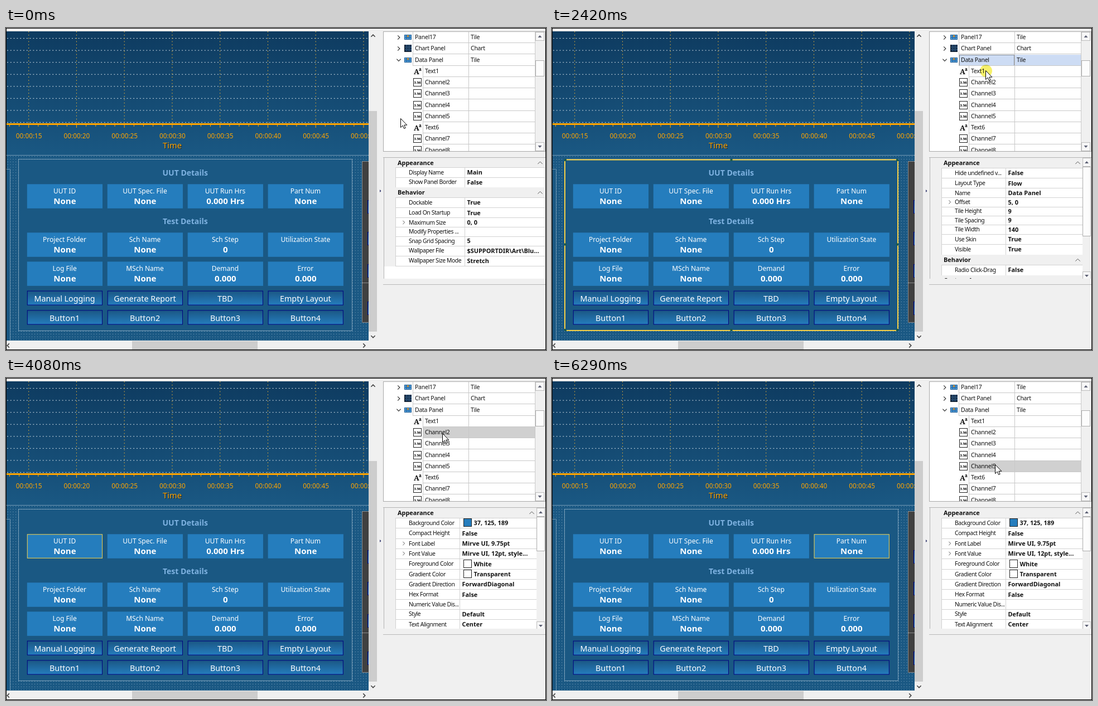
Recreate the animation shown at these times as an HTML page. Size 968x578 px, loop 7.48 s.

```html
<!DOCTYPE html>
<html lang="en">
<head>
<meta charset="utf-8">
<title>Panel properties</title>
<style>
html, body { margin: 0; width: 100%; height: 100%; overflow: hidden; background: #f0f0f0; }
svg { display: block; width: 968px; height: 578px; }
text { font-family: "Noto Sans", sans-serif; white-space: pre; }
#glow { mix-blend-mode: multiply; }
.mid { text-anchor: middle; }
.axis { font-size: 11.8px; fill: #ffa500; }
.time { font-size: 14.6px; fill: #ffa500; }
.head { font-size: 14px; font-weight: 700; fill: #7eb2e1; }
.label { font-size: 12px; fill: #fff; }
.value { font-size: 15px; font-weight: 700; fill: #fff; }
.button { font-size: 14.3px; fill: #fff; }
.tree { font-size: 10.5px; letter-spacing: -.25px; fill: #111; }
.name { font-size: 10.4px; letter-spacing: -.4px; fill: #111; }
.bold { font-size: 10.9px; font-weight: 700; fill: #111; }
</style>
</head>
<body>
<svg id="stage" viewBox="0 0 968 578" xmlns="http://www.w3.org/2000/svg"></svg>
<script>
const LOOP = 7480;
const FONT = 'Mirve UI';
const SCALE = .966;
const SNAP = 5 * SCALE;

const rect = (x, y, w, h, fill, more = '') => `<rect x="${x}" y="${y}" width="${w}" height="${h}" fill="${fill}" ${more}/>`;
const box = (x, y, w, h, fill, stroke, more = '') => rect(x + .5, y + .5, w - 1, h - 1, fill, `stroke="${stroke}" ${more}`);
const path = (d, stroke, more = '') => `<path d="${d}" fill="none" stroke="${stroke}" ${more}/>`;
const text = (x, y, cls, s, more = '') => `<text x="${x}" y="${y}" class="${cls}" ${more}>${s}</text>`;
const repeat = (n, f) => Array.from({ length: n }, (_, i) => f(i)).join('');
const dots = n => `stroke-dasharray="1 ${n}"`;

// Chevron pointing u, d, l or r around a centre.
function chevron(x, y, dir, size, color, width = 1.2) {
  const turn = { u: 0, r: 90, d: 180, l: 270 }[dir];
  return path(`M${-size} ${size / 2}L0 ${-size / 2}L${size} ${size / 2}`, color,
    `stroke-width="${width}" transform="translate(${x} ${y}) rotate(${turn})"`);
}

const defs = `<defs>
  <linearGradient id="sky" x1="0" y1="0" x2="0" y2="1"><stop offset="0" stop-color="#0e3b60"/><stop offset="1" stop-color="#1a5883"/></linearGradient>
  <linearGradient id="push" x1="0" y1="0" x2="0" y2="1"><stop offset="0" stop-color="#1b5784"/><stop offset="1" stop-color="#257dbd"/></linearGradient>
  <pattern id="snap" x="22" y="235" width="${SNAP}" height="${SNAP}" patternUnits="userSpaceOnUse"><rect width="1" height="1" fill="#86a9c2"/></pattern>
  <clipPath id="view"><rect x="1" y="6" width="649" height="555"/></clipPath>
  <clipPath id="treeClip"><rect x="677" y="7" width="289" height="214"/></clipPath>
  <clipPath id="gridClip"><rect x="677" y="233" width="290" height="217"/></clipPath>
</defs>`;

function chart() {
  const xs = i => 40.7 + i * 85.75;
  return rect(1, 6, 649, 223, 'url(#sky)')
    + repeat(8, i => path(`M2 ${18.6 + i * 21.55}H650`, '#d9e4ec', 'stroke-dasharray="1.9 3.9"'))
    + repeat(8, i => path(`M${xs(i)} 6V171`, '#d8a83a', 'stroke-dasharray="1.9 3.9"'))
    + rect(1, 171, 649, 3, '#ffa500')
    + repeat(39, i => path(`M${xs((i - 2) / 5)} 174v${i % 5 == 2 ? 5 : 3}`, '#ffa500'))
    + repeat(8, i => text(xs(i) + .5, 198, 'axis mid', '00:00:' + (15 + i * 5)))
    + text(299, 217, 'time mid', 'Time', 'style="fill:#123"')
    + text(298, 216, 'time mid', 'Time');
}

// Tiles flow on a regular grid inside the panel.
const COLS = [0, 1, 2, 3].map(i => 37.8 + i * 149 * SCALE);
const WIDTH = 140 * SCALE, TALL = 45 * SCALE, SHORT = 27 * SCALE;
const FLOW = { title: 245.5, first: 280.3, second: 367.3, third: 419.4, push: 471.6, last: 506.4 };
const TILES = [
  [FLOW.first, 'UUT ID', 'None', 'UUT Spec. File', 'None', 'UUT Run Hrs', '0.000 Hrs', 'Part Num', 'None'],
  [FLOW.second, 'Project Folder', 'None', 'Sch Name', 'None', 'Sch Step', '0', 'Utilization State', ''],
  [FLOW.third, 'Log File', 'None', 'MSch Name', 'None', 'Demand', '0.000', 'Error', '0.000']
];
const BUTTONS = [
  [FLOW.push, 'Manual Logging', 'Generate Report', 'TBD', 'Empty Layout'],
  [FLOW.last, 'Button1', 'Button2', 'Button3', 'Button4']
];

function dataPanel() {
  const tiles = TILES.map(([y, ...s]) => COLS.map((x, i) =>
    rect(x, y, WIDTH, TALL, '#257dbd') + text(x + 67.3, y + 16.7, 'label mid', s[i * 2])
    + text(x + 67.6, y + 35.7, 'value mid', s[i * 2 + 1])).join('')).join('');
  const buttons = BUTTONS.map(([y, ...s]) => COLS.map((x, i) =>
    box(x, y, WIDTH, SHORT, 'url(#push)', '#000080') + text(x + 67.3, y + 19.3, 'button mid', s[i])).join('')).join('');
  return box(22, 235, 599, 309, '#1a5883', '#dbe6ee', dots(1))
    + text(321.3, 264.8, 'head mid', 'UUT Details') + text(321.3, 351.8, 'head mid', 'Test Details') + tiles + buttons;
}

function layout() {
  return `<g clip-path="url(#view)">` + rect(1, 6, 649, 555, '#1a5883') + chart()
    + rect(1, 229, 649, 332, 'url(#snap)')
    + path('M1 228.5H650', '#c9d8e3', dots(1))
    + rect(1, 253, 7, 308, '#1a5883') + path('M1 253.5H7.5V561', '#c9d8e3', dots(1))
    + rect(638, 239, 12, 290, '#404040')
    + path('M650 239.5H638.5V528.5H650M638.5 457.5H650', '#d8d8d8', dots(1))
    + [309, 366, 424, 491].map(y => box(648, y, 9, 24, 'url(#push)', '#000080')).join('')
    + dataPanel() + '<g id="outline"></g></g>';
}

function mainBars() {
  return rect(650, 6, 16, 555, '#f0f0f0') + rect(650, 149, 15, 396, '#cdcdcd')
    + rect(1, 561, 665, 16, '#f0f0f0') + rect(226, 562, 225, 15, '#cdcdcd')
    + chevron(658, 14, 'u', 3.6, '#404040', 1.6) + chevron(658, 554, 'd', 3.6, '#404040', 1.6)
    + chevron(4, 570, 'l', 3.6, '#404040', 1.6) + chevron(642, 570, 'r', 3.6, '#404040', 1.6);
}

function scrollbar(x, y, h, thumbY, thumbH, w = 15) {
  const arrow = (cy, s) => `<path d="M${x + w / 2 - 3.5} ${cy + 2 * s}h7l-3.5 ${-4 * s}z" fill="#5b5f73"/>`;
  return rect(x, y, w, h, '#f0f0f0') + box(x, y, w, 16, '#f7f7f7', '#bcbcbc')
    + box(x, y + h - 16, w, 16, '#f7f7f7', '#bcbcbc') + box(x, thumbY, w, thumbH, '#fcfcfc', '#adadad')
    + arrow(y + 8, 1) + arrow(y + h - 8, -1);
}

const ROWS = ['Panel17', 'Chart Panel', 'Data Panel', 'Text1', 'Channel2', 'Channel3', 'Channel4', 'Channel5', 'Text6', 'Channel7', 'Channel8'];
const KINDS = ['Tile', 'Chart', 'Tile'];
const rowY = i => Math.round(6 + i * 20.25);

function rowIcon(i, y) {
  if (i == 1) return rect(714, y + 4, 13, 13, '#16314f') + path(`M714 ${y + 8.5}h13m-13 4h13M718.5 ${y + 4}v13m4 -13v13`, '#4d86b8', dots(1))
    + path(`M714.5 ${y + 4}v12.5h12.5`, '#101820');
  if (i < 3) return rect(714, y + 6, 13, 9, '#1e5c94') + [0, 1, 2].map(k =>
    rect(715 + k * 4, y + 7, 3, 3, k == 1 ? '#e0a040' : '#4f9ad6') + rect(715 + k * 4, y + 11, 3, 3, '#4f9ad6')).join('');
  if (ROWS[i].startsWith('Text'))
    return `<text x="731" y="${y + 16}" style="font:700 13px 'Noto Serif',serif">A</text><text x="740" y="${y + 10}" style="font:700 8px 'Noto Serif',serif">a</text>`;
  return box(730, y + 3, 15, 15, '#fff', '#222') + text(737.5, y + 12.5, 'mid', '3.56', 'style="font-size:6px;font-weight:700"');
}

function tree() {
  const rows = ROWS.map((s, i) => {
    const y = rowY(i), x = i < 3 ? 729 : 747;
    return path(`M${x} ${y + 20.5}H948M${x + .5} ${y}v20M829.5 ${y}v20`, '#c8c8c8') + rowIcon(i, y)
      + text(i < 3 ? 733 : 751, y + 14.3, 'tree', s) + (KINDS[i] ? text(833, y + 14.3, 'tree', KINDS[i]) : '');
  }).join('');
  return rect(677, 6, 289, 216, '#fff') + `<g clip-path="url(#treeClip)"><g id="pick"></g>` + rows
    + chevron(704, 17, 'r', 3.6, '#333') + chevron(704, 37, 'r', 3.6, '#333') + chevron(704, 57.5, 'd', 3.6, '#333')
    + path('M948.5 6V222', '#c8c8c8') + '</g>' + scrollbar(949, 7, 214, 58, 29, 16)
    + box(676, 6, 291, 216, 'none', '#a9a9a9');
}

// Each row: centre y, name, value, options. No value marks a category.
const channel = [
  [241.5, 'Appearance'], [260, 'Background Color', '37, 125, 189', { color: '#257dbd' }],
  [278.5, 'Compact Height', 'False'], [297, 'Font Label', FONT + ', 9.75pt', { open: 1 }],
  [315, 'Font Value', FONT + ', 12pt, style...', { open: 1 }], [333.5, 'Foreground Color', 'White', { color: '#fff' }],
  [352, 'Gradient Color', 'Transparent', { color: '#fff' }], [370, 'Gradient Direction', 'ForwardDiagonal'],
  [388.5, 'Hex Format', 'False'], [406, 'Numeric Value Dis...', ''], [423.5, 'Style', 'Default'],
  [442, 'Text Alignment', 'Center'], [460, '', '']
];
const PROPS = {
  main: { rows: [
    [241.5, 'Appearance'], [259, 'Display Name', 'Main'], [276.5, 'Show Panel Border', 'False'], [295, 'Behavior'],
    [313, 'Dockable', 'True'], [331.5, 'Load On Startup', 'True'], [349, 'Maximum Size', '0, 0', { open: 1 }],
    [365.5, 'Modify Properties ...', ''], [382, 'Snap Grid Spacing', '5'], [399.5, 'Wallpaper File', '$SUPPORTDIR\\Art\\Blu...'],
    [417.5, 'Wallpaper Size Mode', 'Stretch']] },
  panel: { thumb: 125, rows: [
    [241.5, 'Appearance'], [260, 'Hide undefined v...', 'False'], [278.5, 'Layout Type', 'Flow'], [296, 'Name', 'Data Panel'],
    [312.5, 'Offset', '5, 0', { open: 1 }], [328.5, 'Tile Height', '9'], [345, 'Tile Spacing', '9'], [361.5, 'Tile Width', '140'],
    [379, 'Use Skin', 'True'], [397, 'Visible', 'True'], [416, 'Behavior'], [434, 'Radio Click-Drag', 'False'], [453, 'Custom Appearance']] },
  label: { thumb: 145, rows: [
    [241.5, 'Appearance'], [260, 'Background Color', 'Transparent', { color: '#fff' }],
    [278.5, 'Font', FONT + ', 11.25pt, style...', { open: 1, plain: 1 }], [297, 'Foreground Color', '126, 178, 225', { color: '#7eb2e1' }],
    [315, 'Gradient Color', 'Transparent', { color: '#fff' }], [333.5, 'Gradient Direction', 'Vertical'], [352, 'Style', 'Default'],
    [370, 'Text', 'UUT Details'], [388.5, 'Text Location', 'MiddleCenter'], [407, 'Behavior'], [425.5, 'Scrolling', 'False'], [443.5, 'Layout']] },
  channel: { thumb: 62, rows: channel }
};

function propGrid(id) {
  const { rows, thumb } = PROPS[id];
  const right = thumb ? 951 : 966, split = thumb ? 813 : 822;
  const body = rows.map(([y, name, value, opt = {}], i) => {
    const top = i ? Math.round((rows[i - 1][0] + y) / 2) : 233;
    const end = Math.round(rows[i + 1] ? (rows[i + 1][0] + y) / 2 : y + 9);
    const line = `M${value === undefined ? 677 : 698} ${end + .5}H${right}`;
    if (value === undefined)
      return rect(677, top, right - 677, end - top, '#f0f0f0') + path(line, '#d2d2d2')
        + text(702, y + 4.2, 'bold', name) + chevron(right - 8.5, y + .5, 'u', 4.2, '#555', 1);
    const vx = split + 4.5 + (opt.color ? 21 : 0);
    return rect(677, top, 21, end - top + 1, '#f0f0f0') + path(line + `M698.5 ${top}V${end}M${split + .5} ${top}V${end}`, '#d2d2d2')
      + (opt.open ? chevron(713, y, 'r', 3.2, '#555', 1) : '')
      + (opt.color ? box(820, Math.round(y) - 8, 15, 15, opt.color, '#222') : '')
      + text(722, y + 3.8, 'name', name) + text(vx, y + 4, opt.plain ? 'name' : 'bold', value);
  }).join('');
  return `<g id="${id}" clip-path="url(#gridClip)">` + rect(677, 233, 290, 217, '#fff') + body
    + (thumb ? scrollbar(951, 233, 220, 249, thumb) : '') + '</g>';
}

const frame = path('M676 232.5H967M677.5 233V450', '#b4b4b4') + path('M676 460.5H967', '#b9b9b9')
  + '<path d="M670 290l2.5 2.5-2.5 2.5z" fill="#33386e"/>' + box(0, 0, 968, 578, 'none', '#000');

const pointer = `<circle id="glow" r="11" fill="#f6f06a"/><g id="pointer">
  <path d="M.5 .5V16.6L4.2 13.1L6.6 18.6L9.1 17.5L6.8 12.2H11.8Z" fill="#fff" stroke="#000"/></g>`;

const stage = document.getElementById('stage');
stage.innerHTML = defs + rect(0, 0, 968, 578, '#f0f0f0') + layout() + mainBars() + tree()
  + Object.keys(PROPS).map(propGrid).join('') + frame + pointer;
const get = id => document.getElementById(id);

const MOVES = [
  // first step, last step, steps, end x, end y
  [190, 880, 11, 777, 59], [950, 950, 1, 777, 58], [1940, 2150, 4, 777, 76], [3090, 3360, 4, 781, 95],
  [3950, 4360, 7, 785, 113], [4890, 5160, 5, 792, 135], [5690, 5900, 4, 794, 155]
];
const CLICKS = [
  // press, row shown, done, row, properties
  [1210, 1270, 1340, 2, 'panel'], [2420, 2480, 2540, 3, 'label'], [3620, 3750, 3750, 4, 'channel'],
  [4560, 4690, 4690, 5, 'channel'], [5360, 5490, 5490, 6, 'channel'], [6160, 6290, 6290, 7, 'channel']
];
const ease = p => .5 * p + .5 * p * p * (3 - 2 * p);

function pointerAt(t) {
  let x = 707, y = 162;
  for (const [from, to, n, ex, ey] of MOVES) {
    if (t < from) break;
    const step = n > 1 ? Math.floor((t - from) / (to - from) * (n - 1) + 1e-6) + 1 : 1;
    const p = ease(Math.min(1, step / n));
    x += (ex - x) * p;
    y += (ey - y) * p;
  }
  return [Math.round(x), Math.round(y)];
}

function outlineFor(row) {
  const yellow = '#f5cf45';
  if (row == 2) {
    const handles = [24, 321.5, 619].map(x => [237, 388.5, 542].map(y =>
      x == 321.5 && y == 388.5 ? '' : rect(x - 2, y - 2, 4, 4, '#1c5b4a')).join('')).join('');
    return path('M23 236.5H620V543H23Z', yellow, 'stroke-width="2"') + handles;
  }
  if (row == 3) return box(COLS[0], FLOW.title, COLS[3] + WIDTH - COLS[0], SHORT, 'none', yellow);
  return row > 3 ? box(COLS[row - 4], FLOW.first, WIDTH, TALL, 'none', yellow) : '';
}

function highlight(row, pressed) {
  if (!row) return '';
  const x = row < 3 ? 730 : 748, y = rowY(row);
  return rect(x, y + 1, 948 - x, 20, pressed ? '#cddcf4' : '#d0d0d0')
    + (pressed ? box(x, y + 1, 829 - x, 20, 'none', '#333', dots(1)) : '');
}

let shown = '';
function draw(now) {
  const t = now % LOOP;
  let shownRow = 0, row = 0, props = 'main', pressed = false;
  for (const [press, pick, done, r, p] of CLICKS) {
    if (t >= press && t < done) pressed = true;
    if (t >= pick) shownRow = r;
    if (t >= done) { row = r; props = p; }
  }
  const [x, y] = pointerAt(t);
  get('pointer').setAttribute('transform', `translate(${x} ${y})`);
  get('glow').setAttribute('transform', `translate(${x + 1} ${y + 1})`);
  const key = [shownRow, row, pressed].join();
  if (key != shown) {
    shown = key;
    get('glow').style.display = pressed ? '' : 'none';
    get('pick').innerHTML = highlight(shownRow, pressed);
    get('outline').innerHTML = outlineFor(row);
    for (const id in PROPS) get(id).style.display = id == props ? '' : 'none';
  }
}

const start = performance.now();
function tick() {
  draw(performance.now() - start);
  requestAnimationFrame(tick);
}
tick();
</script>
</body>
</html>
```
